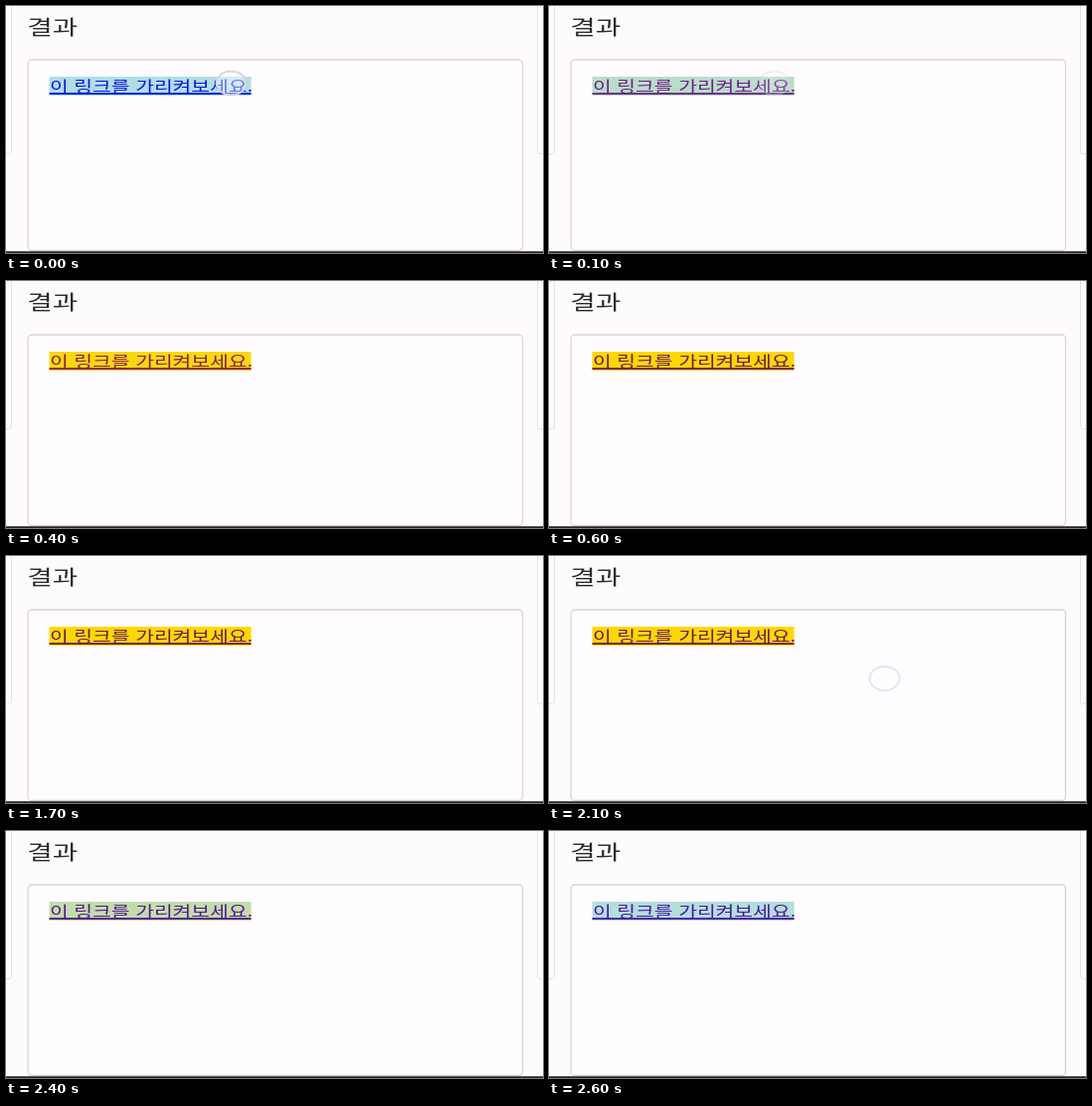
Recreate the animation shown at these times as an HTML page. Size 540 px wide and 248 px high, loop 2.7 s.

```html
<!DOCTYPE html>
<html lang="ko">
<head>
<meta charset="utf-8">
<style>
  html, body { margin: 0; width: 100%; height: 100%; overflow: hidden; background: #fdfbfe; }
  svg { display: block; }
  text { font-family: "Noto Sans CJK KR", "Noto Sans CJK", sans-serif; }
  .edge { fill: none; stroke: #e6e2e7; }
</style>
</head>
<body>
<svg width="540" height="248" viewBox="0 0 540 248">
  <path class="edge" d="M5.5 0V146Q5.5 148.5 3 148.5H0M534.5 0V146Q534.5 148.5 537 148.5H540"/>
  <rect id="panel" x="22" y="54" width="497.5" height="191.5" rx="4" fill="#fefcff" stroke-width="1.3"/>
  <rect y="246.3" width="540" height="1.7" fill="#202020"/>
  <!-- the page is shown 1.33 times wider than tall -->
  <text transform="translate(21.3 29.2) scale(1.33 1)" font-size="20.8" fill="#2b292c">결과</text>
  <rect id="mark" x="43.5" y="71" width="203" height="19"/>
  <g id="link">
    <text transform="translate(43.9 85.8) scale(1.33 1)" font-size="15.3">이 링크를 가리켜보세요.</text>
    <rect x="43.5" y="87.1" width="203" height="1.8"/>
  </g>
  <ellipse id="tap" rx="15" ry="12" fill="#fff" fill-opacity=".4" stroke="#d8d5dd" stroke-width="1.8"/>
</svg>
<script>
  const LOOP = 2700;
  const COOL = [176, 222, 228], WARM = [255, 215, 0];
  const BLUE = [8, 20, 232], RED = [214, 40, 44], PLUM = [106, 26, 92], VIOLET = [74, 24, 160];
  const $ = id => document.getElementById(id);
  const mix = (a, b, k) => `rgb(${a.map((v, i) => Math.round(v + (b[i] - v) * k))})`;

  // start ms, warmth of the background, text from, text to, blend, tap opacity
  const steps = [
    [0, 0, BLUE, BLUE, 0, 1],
    [100, 0.12, BLUE, RED, 0.5, 0.4],
    [200, 0.38, RED, RED, 0, 0],
    [300, 0.72, RED, PLUM, 0.3, 0],
    [400, 0.92, RED, PLUM, 0.7, 0],
    [500, 1, PLUM, PLUM, 0, 0],
    [2100, 1, PLUM, PLUM, 0, 0.6],
    [2200, 1, PLUM, PLUM, 0, 1],
    [2300, 0.65, PLUM, VIOLET, 0.3, 0.4],
    [2400, 0.25, PLUM, VIOLET, 0.75, 0],
    [2500, 0.1, VIOLET, VIOLET, 0, 0],
    [2600, 0.04, VIOLET, VIOLET, 0, 0]
  ];

  function draw(now) {
    const t = now % LOOP;
    const [, warmth, from, to, blend, tap] = steps.filter(s => s[0] <= t).pop();
    const late = t >= 2100;
    $("mark").setAttribute("fill", mix(COOL, WARM, warmth));
    $("link").setAttribute("fill", mix(from, to, blend));
    $("panel").setAttribute("stroke", late ? "#d6d4d6" : "#dfd3d5");
    $("tap").setAttribute("transform", late ? "translate(337.5 123)" : "translate(226.5 77.5)");
    $("tap").setAttribute("opacity", tap);
  }

  const start = performance.now();
  (function tick() {
    draw(performance.now() - start);
    requestAnimationFrame(tick);
  })();
</script>
</body>
</html>
```
